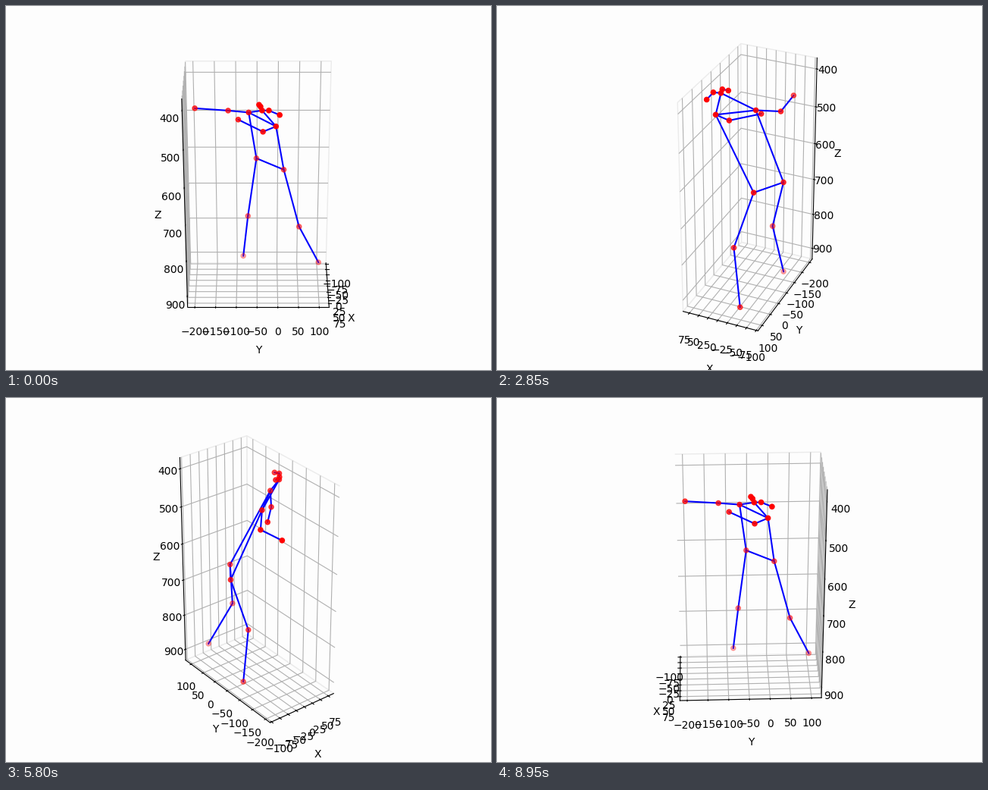
A matplotlib script that plays this animation: 640 by 480 pixels, repeating every 9000 ms.

```python
import matplotlib.pyplot as plt
import numpy as np
from matplotlib.animation import FuncAnimation

PAPER = "#fdfdfd"
FRAMES, INTERVAL = 180, 50

JOINTS = {
    "nose": (61.7, -38.4, 415.5),
    "l_eye": (59.7, -41.9, 406.9),
    "r_eye": (74.0, -23.2, 409.2),
    "l_ear": (46.0, -45.3, 409.0),
    "r_ear": (79.4, 1.1, 417.8),
    "l_shoulder": (-13.0, -69.3, 458.9),
    "r_shoulder": (60.8, -6.8, 456.5),
    "l_elbow": (-55.4, -117.8, 475.8),
    "r_elbow": (40.3, -36.3, 481.2),
    "l_wrist": (-55.4, -195.8, 469.7),
    "r_wrist": (-15.9, -93.7, 479.0),
    "l_hip": (-92.0, -51.6, 623.8),
    "r_hip": (-44.3, 13.8, 628.4),
    "l_knee": (-56.4, -72.3, 764.8),
    "r_knee": (-10.0, 51.5, 766.9),
    "l_ankle": (-81.6, -84.4, 896.3),
    "r_ankle": (-48.6, 102.0, 894.2),
}

CHAINS = [
    "l_ear l_eye nose r_eye r_ear",
    "l_shoulder nose r_shoulder l_shoulder",
    "l_shoulder l_elbow l_wrist",
    "r_shoulder r_elbow r_wrist",
    "l_shoulder l_hip l_knee l_ankle",
    "r_shoulder r_hip r_knee r_ankle",
    "l_hip r_hip",
]

points = np.array(list(JOINTS.values()))
low, high = points.min(axis=0), points.max(axis=0)
pad = (high - low) * (1.1 * 25 / 24 - 1) / 2
low, high = low - pad, high + pad

fig = plt.figure(figsize=(6.4, 4.8), dpi=100, facecolor=PAPER)
ax = fig.add_subplot(projection="3d", facecolor=PAPER)

ax.scatter(*points.T, c="red", marker="o")
for chain in CHAINS:
    names = chain.split()
    for a, b in zip(names, names[1:]):
        ax.plot(*zip(JOINTS[a], JOINTS[b]), color="blue")

ax.set_xlim(low[0], high[0])
ax.set_ylim(low[1], high[1])
ax.set_zlim(high[2], low[2])
ax.set_box_aspect(high - low)
ax.set_xlabel("X")
ax.set_ylabel("Y")
ax.set_zlabel("Z")
for axis in (ax.xaxis, ax.yaxis, ax.zaxis):
    axis.set_pane_color(PAPER)
    axis.pane.set_edgecolor("#ebebeb")


def update(i):
    ax.view_init(elev=30, azim=i * 360 / FRAMES)
    return []


anim = FuncAnimation(fig, update, frames=FRAMES, interval=INTERVAL,
                     repeat=True, repeat_delay=0)
plt.show()
```
